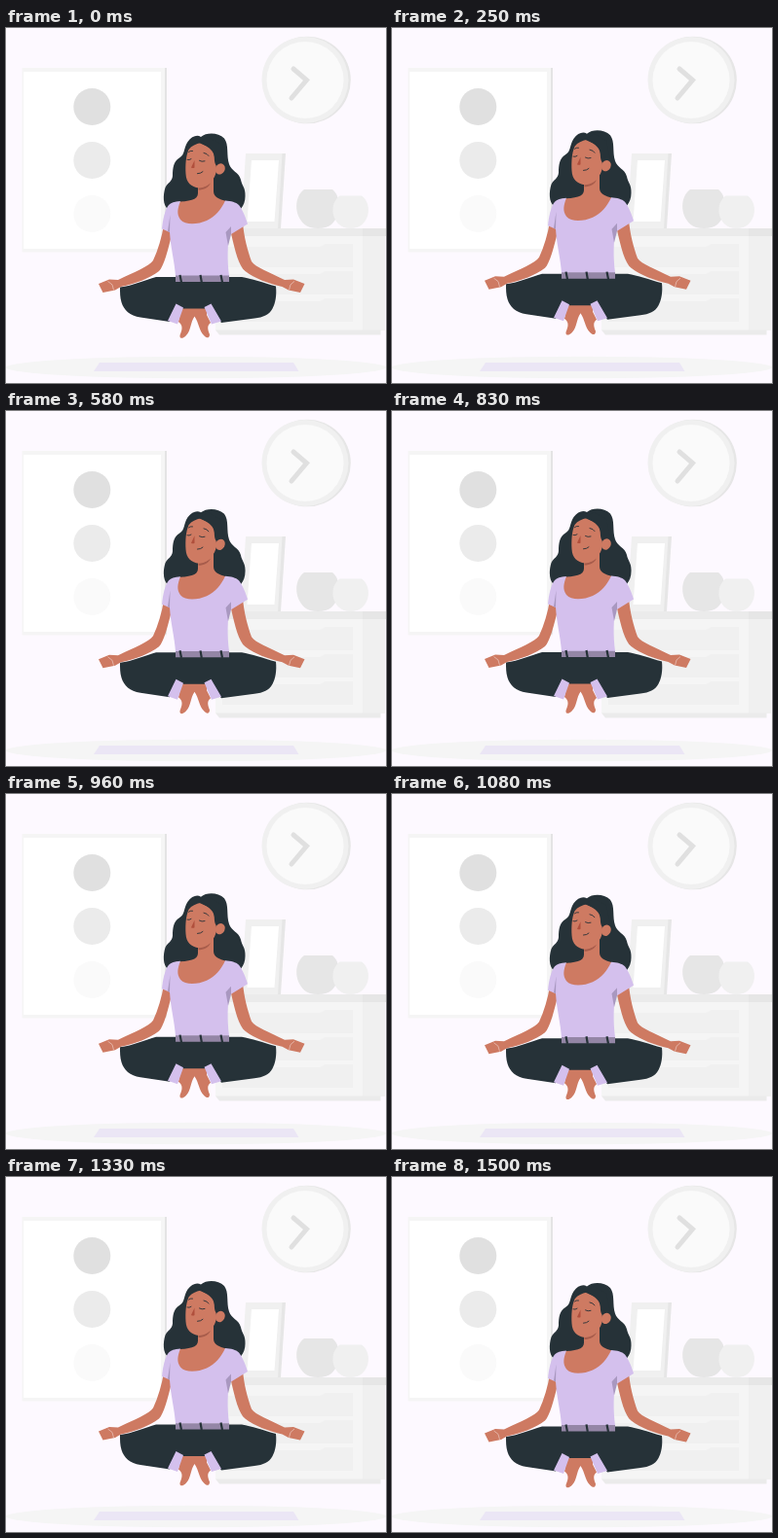
Write an HTML page that moves like this. It is 390x365 px and loops after 1540 ms.

```html
<!DOCTYPE html>
<html lang="en">
<head>
<meta charset="utf-8">
<title>Floating meditation</title>
<style>
html, body { margin: 0; width: 100%; height: 100%; overflow: hidden; background: #fdf9ff; }
svg { display: block; width: 390px; height: 365px; }
.skin { fill: #ce7a62; }
.dark { fill: #263238; }
.lilac { fill: #d4c0ed; }
.line { fill: none; stroke: #263238; stroke-width: .9; stroke-linecap: round; }
.crease { fill: none; stroke: #ecc9c0; stroke-width: .7; }
</style>
</head>
<body>
<svg viewBox="0 0 390 365">
  <rect width="390" height="365" fill="#fdf9ff"/>

  <!-- wall picture -->
  <path fill="#f5f5f5" d="M16.500 41H165V230.500H16.500Z"/>
  <path fill="#e4e4e4" d="M163 41H165V229L163 230.500Z"/>
  <path fill="#fff" d="M18 45H159V227H18Z"/>
  <circle cx="88.300" cy="81" r="19" fill="#e0e0e0"/>
  <circle cx="88.300" cy="136" r="19" fill="#ebebeb"/>
  <circle cx="88.300" cy="191" r="19" fill="#fafafa"/>

  <!-- clock -->
  <circle cx="309" cy="53.500" r="44.800" fill="#e6e6e6"/>
  <circle cx="307" cy="53.500" r="44.500" fill="#f0f0f0"/>
  <circle cx="307" cy="53.500" r="39.500" fill="#fafafa"/>
  <path d="M295 42L308.500 53.500L293 72" fill="none" stroke="#e0e0e0" stroke-width="5" stroke-linecap="round"/>

  <!-- photo frame and vases -->
  <path fill="#e6e6e6" d="M250 129H287L282 206H245Z"/>
  <path fill="#f0f0f0" d="M246 129H283.500L279 206H241Z"/>
  <path fill="#fff" d="M252 136H280L275.500 199H247.500Z"/>
  <path fill="#e6e6e6" d="M306 166H335C344 173 345 192 334 202Q329 206 320 206Q311 206 306.500 202C295 192 296 173 306 166Z"/>
  <path fill="#f0f0f0" d="M342.500 172.500H365C374 179 374.500 194 365.500 202Q361 206 353.500 206Q346 206 342 202C333 194 333.500 179 342.500 172.500Z"/>

  <!-- cabinet -->
  <path fill="#f0f0f0" d="M366 214H389V311H366Z"/>
  <path fill="#f5f5f5" d="M215 214H366V311H215Z"/>
  <path fill="#ebebeb" d="M215 206H390V214H215Z"/>
  <path fill="#e6e6e6" d="M366 206H390V214H366Z"/>
  <path fill="#f0f0f0" d="M222 222H356V246H222ZM222 250H356V274H222ZM222 278H356V302H222Z"/>
  <path fill="#f5f5f5" d="M222 222H328L322 225H222ZM222 250H328L322 253H222ZM222 278H328L322 281H222Z"/>
  <path fill="#ebebeb" d="M215 310.500H384.500V315.500H219Z"/>

  <!-- floor and mat -->
  <ellipse cx="195" cy="349" rx="195" ry="11.300" fill="#f5f5f5"/>
  <path fill="#ebe6f5" d="M96 344H295L300.500 353H90Z"/>

  <g id="figure">
    <path class="dark" d="M200 112C206 107 218 107.500 224 113.500C229 120 226 131 229 140C231 147 239 148 241 156C242 162 246 164 245.500 173C245.500 178 244 182 241 186H166C161 182 161 172 163.500 164C166 159 170.500 158 171 152C171 144 172 137 178 133.500C184 130 182 124 186.500 117C190.500 111.500 196 109.500 200 112Z"/>

    <!-- neck and chest -->
    <path class="skin" d="M197 159L213 154V168C213 174 219 176 226 178L222 203H174V179C188 178 197 177 197 170Z"/>
    <path fill="#a75c4b" d="M197.500 163.500C203 164 207 162 210 159.500C208 164 203 166.500 197.500 166.500Z"/>

    <!-- head -->
    <path class="skin" d="M187.500 125C190.500 121 195 119 200 118C205 122 213 123 214.500 135C216 143 217 147 214 153C210 160 204 164.500 198 164.500C190 163.500 185 159 184.500 150C184 141 184.500 132 187.500 125Z"/>
    <ellipse class="skin" cx="219.800" cy="145" rx="4.800" ry="5.800" transform="rotate(25 219.800 145)"/>
    <path class="dark" d="M198 118C204 121 212 122 213.500 129C214 133 213.500 138 215.500 141L219 138L224 139L220 119L207 112Z"/>
    <path class="line" d="M186 135.500Q188 136.300 190 134.800M198.500 136.500Q201 138 204 137M187.500 127.500Q189 126 191.500 126.500M203 128.500Q206.500 129 208 131.500M196.500 149.800Q200 149.800 202 147.800"/>
    <path fill="#b04f3c" d="M193.500 136L190 143.500Q192 144.500 193.500 143.500Z"/>

    <!-- legs and feet -->
    <path class="skin" d="M180 287H207L206 295L210 303C206 306 207 310 209 315C209 319 206 319.500 203 316C198 311 198 303 193.500 296.500C189 303 190 311 185 316C182 319.500 178 320 178.500 316C181 310 182 306 177 302Z"/>
    <path class="dark" d="M154 256H242C252 257.500 264 262 277 265.500C278 275 276.500 283 273.500 288.500C270 295 264 297.500 255 298.500L221 303L210 288.500H180L168 302L138 297.500C127 296 121 290 118.500 282C117 277 117 272 117 266.500C130 265 143 259 154 256Z"/>
    <path class="lilac" d="M174.500 283.500L182 287.500L176 304.500L166 301ZM203.500 287L210.500 283.500L221 301.500L211 304.500Z"/>

    <!-- arms -->
    <path class="skin" d="M162 202C160 215 156 228 151 239C147 245 132 251 115 259L106 258.500L95 263L99.500 272L112 269.500L118 266C133 263 147 257.500 157 250C162 245 166 229 170.500 211V202Z"/>
    <path class="skin" d="M243 200C244 214 248 229 252 240C256 246 270 251 286 259L295 258.500L306.500 263L302 272L290 269.500L283.500 266C270 263 255 257.500 245.500 250C239 245 235 229 231 211V200Z"/>
    <path class="crease" d="M104.500 260.500L109 264L110.500 269.500M296 260.500L292 264L290.500 269.500"/>

    <!-- shirt -->
    <path class="lilac" d="M179 178C176 186 175 191 179 197C184 203 197 202 206 198C215 194 221 186 225 177.500C231 178 236 179 239 182C243 187 246 195 248 201.500L231 212L230 207C227 223 227 239 229 255H174C173 240 169 226 168 210L160 206.500C161 197 163 187 167 182C169 179.500 173 178.500 179 178Z"/>
    <path fill="#a998c0" d="M168.500 192L166 209L168 210ZM231 204L225.500 210L228 224L231 212Z"/>

    <!-- belt -->
    <path fill="#9486a6" d="M174 254.700H229V261H174Z"/>
    <path class="line" style="stroke-width:2.200;stroke-linecap:butt" d="M178.500 254L180 261.500M199.500 254L200.800 261.500M220.500 254L222 261.500"/>
  </g>
</svg>
<script>
const LOOP = 1540, FPS = 24, LOW = 0.55, RISE = 10, TOP_AT = 720;
const figure = document.getElementById('figure');

// Steady rise and fall, sampled at 24 steps a second
function draw(ms) {
  const tick = Math.floor(ms % LOOP / 10);
  const t = Math.floor((tick + 0.49) * FPS / 100) * 1000 / FPS;
  const away = Math.abs(t - TOP_AT);
  const near = Math.min(away, LOOP - away) / (LOOP / 2);
  const y = LOW - RISE * (1 - near);
  figure.setAttribute('transform', `translate(0 ${y.toFixed(2)})`);
}

const start = performance.now();
function loop() {
  draw(performance.now() - start);
  requestAnimationFrame(loop);
}
loop();
</script>
</body>
</html>
```
